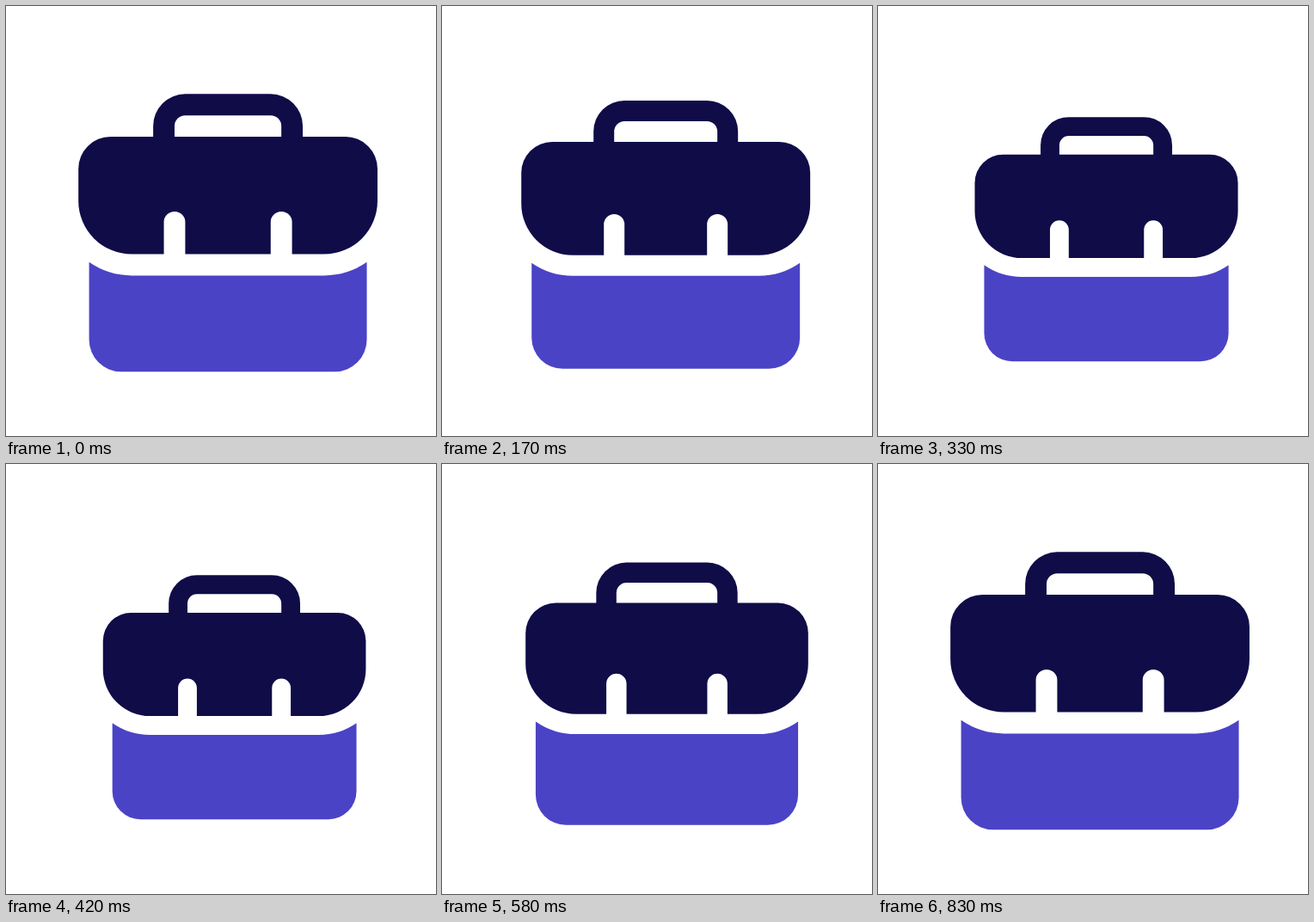
These frames come from a looping animation (500 by 500 pixels, 2580 ms). An HTML page:

```html
<!DOCTYPE html>
<html lang="en">
<head>
<meta charset="utf-8">
<title>Briefcase pulse</title>
<style>
  html, body { margin: 0; width: 100%; height: 100%; overflow: hidden; background: #fff; }
  svg { display: block; width: 100%; height: 100%; }
</style>
</head>
<body>
<svg viewBox="0 0 500 500">
  <!-- The case is drawn on a 28 x 26 unit grid -->
  <g transform="translate(84.2 102.3) scale(12.42)">
    <g id="case">
      <path fill="#0f0c48" fill-rule="evenodd" d="M7 4V3a3 3 0 0 1 3-3h8a3 3 0 0 1 3 3v1h4a3 3 0 0 1 3 3v3a5 5 0 0 1-5 5h-3v-3a1 1 0 0 0-2 0v3H10v-3a1 1 0 0 0-2 0v3H5a5 5 0 0 1-5-5V7a3 3 0 0 1 3-3z M9 4h10V3a1 1 0 0 0-1-1h-8a1 1 0 0 0-1 1z"/>
      <path fill="#4b43c6" d="M1 15.745A7 7 0 0 0 5 17H23A7 7 0 0 0 27 15.745V23a3 3 0 0 1-3 3H4a3 3 0 0 1-3-3z"/>
    </g>
  </g>
</svg>
<script>
  const LOOP = 2580;
  const FPS = 12;
  const PIVOT = { x: 19, y: 18 };
  // How far the case shrinks at each step, eased in and out
  const shrink = [0, 0.005, 0.034, 0.085, 0.12, 0.121, 0.095, 0.055, 0.0205, 0.003, 0];
  const briefcase = document.getElementById('case');

  // Steps run at 12 per second, on whole hundredths of a second
  const stepStart = step => Math.round(step * 100 / FPS) * 10;

  function render(time) {
    let step = 0;
    while (step < shrink.length - 1 && stepStart(step + 1) <= time) step++;
    const scale = 1 - shrink[step];
    briefcase.setAttribute('transform',
      `translate(${PIVOT.x} ${PIVOT.y}) scale(${scale}) translate(${-PIVOT.x} ${-PIVOT.y})`);
  }

  const start = performance.now();
  function tick() {
    render((performance.now() - start) % LOOP);
    requestAnimationFrame(tick);
  }
  tick();
</script>
</body>
</html>
```
